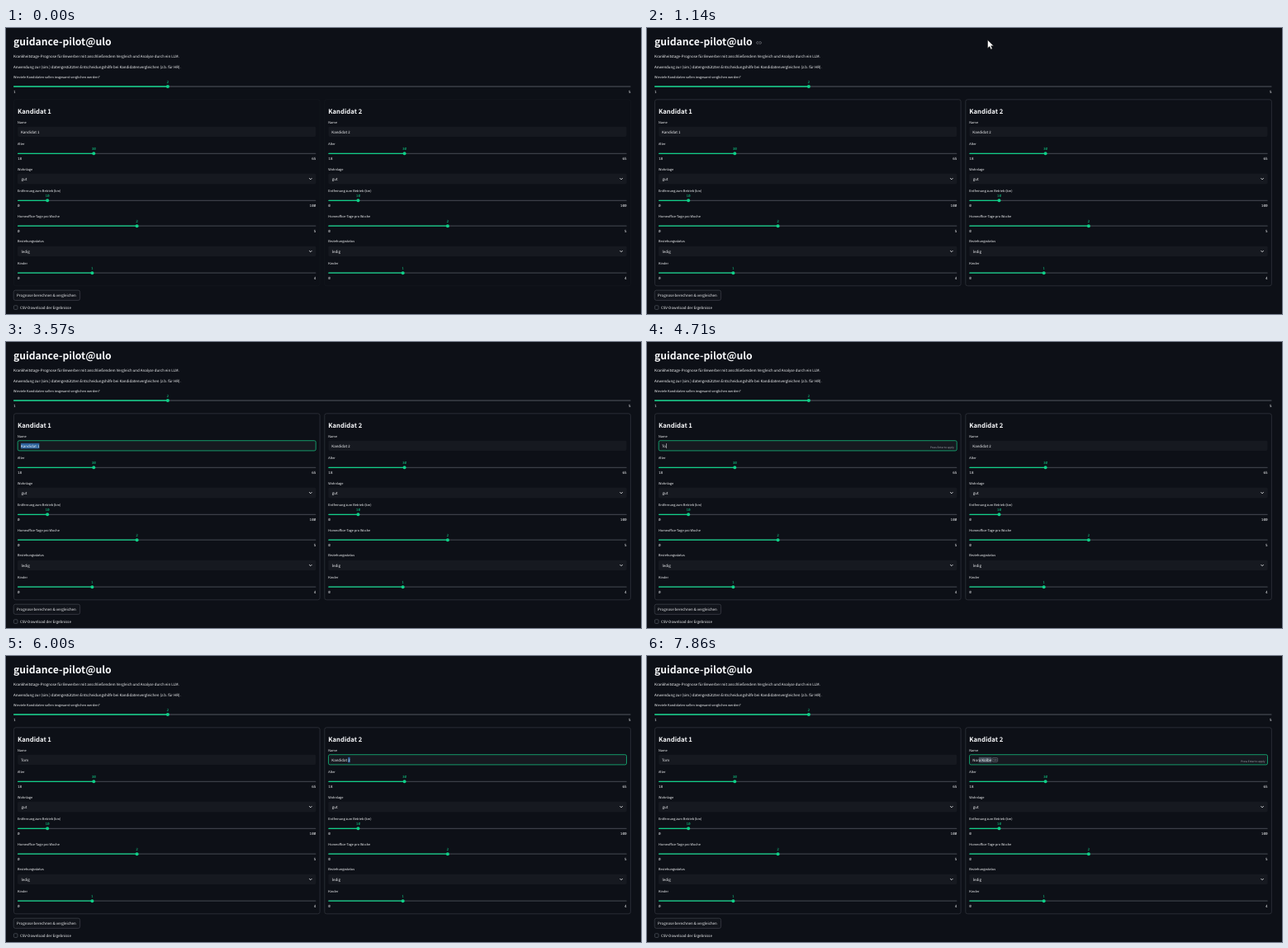
Animation of 769x347 px, one loop 8 s. Source, as an HTML page:

```html
<!DOCTYPE html>
<html lang="de">
<head>
<meta charset="utf-8">
<style>
html, body { margin: 0; width: 100%; height: 100%; overflow: hidden; background: #0d1017; }
svg { display: block; width: 769px; height: 347px; }
text {
  font-family: "Noto Sans CJK JP", "Noto Sans CJK SC", "Noto Sans CJK KR", "Noto Sans CJK", "Open Sans", sans-serif;
  fill: #f7f8fa; white-space: pre; text-rendering: geometricPrecision;
}
.bold { font-weight: 700; }
.mono { font-family: "Noto Sans Mono", monospace; }
</style>
</head>
<body>
<script>
const LOOP = 8000, STEP = LOOP / 56;
const GREEN = '#10cf88', FIELD = '#161920', LINE = '#30333c';
const BODY = 4.45, LABEL = 3.9, NUM = 4.35, NAME_Y = 125.9;

function add(parent, tag, attrs = {}) {
  const el = document.createElementNS('http://www.w3.org/2000/svg', tag);
  for (const key in attrs) el.setAttribute(key, attrs[key]);
  return parent.appendChild(el);
}

// y is the middle of the capital letters
function label(parent, x, y, size, str, attrs = {}) {
  const el = add(parent, 'text', { x, y: y + size * 0.36, 'font-size': size, ...attrs });
  el.textContent = str;
  return el;
}

function box(parent, x, y, width, height, attrs = {}) {
  return add(parent, 'rect', { x, y, width, height, rx: 1.8, ...attrs });
}

function slider(parent, x, y, width, low, high, value) {
  const pos = x + width * (value - low) / (high - low);
  const mono = { class: 'mono' };
  box(parent, x, y - 0.65, width, 1.3, { rx: 0.6, fill: '#3b3f47' });
  box(parent, x, y - 0.65, pos - x, 1.3, { rx: 0.6, fill: GREEN });
  add(parent, 'circle', { cx: pos, cy: y, r: 2, fill: GREEN });
  label(parent, pos, y - 5.7, NUM, value, { ...mono, style: 'fill:' + GREEN, 'text-anchor': 'middle' });
  label(parent, x, y + 6.4, NUM, low, mono);
  label(parent, x + width, y + 6.4, NUM, high, { ...mono, 'text-anchor': 'end' });
}

function select(parent, y, str) {
  box(parent, 14, y - 6.2, 361.4, 12.4, { fill: FIELD });
  label(parent, 18.5, y, BODY, str);
  add(parent, 'path', {
    d: `M367.2 ${y - 0.8}l1.6 1.6l1.6 -1.6`, fill: 'none', stroke: '#f2f3f5', 'stroke-width': 0.9
  });
}

function candidate(number) {
  const g = add(svg, 'g', { transform: `translate(${(number - 1) * 376.3} 0)` });
  const frame = box(g, 9.5, 86.8, 370.6, 226, { rx: 2.4, fill: 'none', stroke: LINE, 'stroke-width': 0.8 });
  label(g, 14, 100.8, 7.7, 'Kandidat ' + number, { class: 'bold' });

  label(g, 14, 114.3, LABEL, 'Name');
  const field = box(g, 14.2, 119.7, 361, 12.2, { fill: FIELD, 'stroke-width': 0.8 });
  const mark = box(g, 18, 122.8, 0, 6.6, { rx: 0 });
  const text = label(g, 18, NAME_Y, BODY, '');
  const caret = box(g, 0, 123, 0.5, 6, { rx: 0, fill: '#f7f8fa' });
  const hint = label(g, 372, 128.2, 3.15, 'Press Enter to apply', { style: 'fill:#a6a9b0', 'text-anchor': 'end' });
  const tab = add(g, 'g');
  box(tab, 0, 123.6, 6.6, 4.8, { rx: 1, fill: '#20242c', stroke: '#80858e', 'stroke-width': 0.5 });
  label(tab, 3.3, 126, 2.5, 'Tab', { style: 'fill:#a6a9b0', 'text-anchor': 'middle' });

  label(g, 14, 140.6, LABEL, 'Alter');
  slider(g, 14, 152.3, 361.4, 18, 65, 30);
  label(g, 14, 171.3, LABEL, 'Wohnlage');
  select(g, 183, 'gut');
  label(g, 14, 197.7, LABEL, 'Entfernung zum Betrieb (km)');
  slider(g, 14, 209.3, 361.4, 0, 100, 10);
  label(g, 14, 228.3, LABEL, 'Homeoffice-Tage pro Woche');
  slider(g, 14, 240.2, 361.4, 0, 5, 2);
  label(g, 14, 259, LABEL, 'Beziehungsstatus');
  select(g, 270.9, 'ledig');
  label(g, 14, 285.4, LABEL, 'Kinder');
  slider(g, 14, 297.2, 361.4, 0, 4, 1);

  const show = (el, on) => el.setAttribute('visibility', on ? 'visible' : 'hidden');
  const widthOf = n => n > 0 ? text.getSubStringLength(0, n) : 0;

  // from: index where the selection starts; it runs to the end of the text
  function setName({ str, focus, from = str.length, hinted, offer }) {
    text.textContent = str;
    const start = 18 + widthOf(from), end = 18 + widthOf(str.length);
    field.setAttribute('stroke', focus ? '#16b87c' : 'none');
    mark.setAttribute('x', start);
    mark.setAttribute('width', end - start);
    mark.setAttribute('fill', offer ? '#46505c' : '#2b629c');
    caret.setAttribute('x', end + 0.2);
    show(caret, focus && from === str.length);
    show(hint, hinted);
    show(tab, offer);
    tab.setAttribute('transform', `translate(${end + 0.8} 0)`);
  }
  return { frame, setName };
}

const svg = add(document.body, 'svg', { viewBox: '0 0 769 347' });
label(svg, 9, 16.8, 12.2, 'guidance-pilot@ulo', { class: 'bold' });
const anchor = add(svg, 'path', {
  d: 'M135 16.6h-1.2a1.3 1.3 0 0 0 0 2.6h1.2M136 16.6h1.2a1.3 1.3 0 0 1 0 2.6h-1.2M134.4 17.9h2.2',
  fill: 'none', stroke: '#81858c', 'stroke-width': 0.6
});
label(svg, 9, 34.2, BODY, 'Krankheitstage-Prognose für Bewerber mit anschließendem Vergleich und Analyse durch ein LLM.');
label(svg, 9, 47.1, BODY, 'Anwendung zur (sim.) datengestützten Entscheidungshilfe bei Kandidatenvergleichen (z.b. für HR).');
label(svg, 9, 59.4, LABEL, 'Wieviele Kandidaten sollen insgesamt verglichen werden?');
slider(svg, 9, 71, 747.6, 1, 5, 2);
const cards = [candidate(1), candidate(2)];
box(svg, 9.2, 318.2, 80.4, 12.2, { rx: 2.2, fill: '#11141b', stroke: '#3a3d46', 'stroke-width': 0.8 });
label(svg, 13, 324.3, BODY, 'Prognose berechnen & vergleichen');
box(svg, 9.4, 336.8, 4.6, 4.6, { rx: 1, fill: 'none', stroke: '#4a4e57', 'stroke-width': 0.8 });
label(svg, 17, 339.2, BODY, 'CSV-Download der Ergebnisse');

const outline = { fill: '#fff', stroke: '#111', 'stroke-width': 0.5, 'stroke-linejoin': 'round' };
const arrow = add(svg, 'path', { d: 'M0 0V10L2.4 7.9L4 11.4L5.7 10.6L4.1 7.2H7.3Z', ...outline });
const hand = add(svg, 'path', {
  d: 'M-1 .8Q0 -.6 1 .8V4.6L4.2 5.3Q5.4 5.7 5.2 7.2L4.3 10.4V12.4H-.9V10.9L-3.2 7.9Q-3.6 6.5 -2.3 6.7L-1 7.7Z',
  ...outline
});

const routes = [
  [[700, 470, -8], [1140, 412.5, 14.5], [1430, 412.5, 14.5], [2290, 234, 71.5], [2710, 234, 71.5], [3140, 42, 126]],
  [[4990, 20, 128], [5710, 417, 127]]
];

function pointer(t) {
  for (const route of routes) {
    for (let i = 1; i < route.length; i++) {
      const [t0, x0, y0] = route[i - 1], [t1, x1, y1] = route[i];
      if (t < t0 || t >= t1) continue;
      const p = (t - t0) / (t1 - t0), k = p * p * (3 - 2 * p);
      return [x0 + (x1 - x0) * k, y0 + (y1 - y0) * k];
    }
  }
}

// Selection dragged from the end of the text to its beginning
const drag = (t, t0, t1) => t >= t1 ? 0 : Math.ceil(10 * (t1 - t) / (t1 - t0));

function firstName(t) {
  if (t < 3140) return { str: 'Kandidat 1', focus: false };
  if (t < 4140) return { str: 'Kandidat 1', focus: true, from: drag(t, 3140, 3430) };
  const str = 'Tom'.slice(0, t < 4420 ? 1 : t < 4850 ? 2 : 3);
  return { str, focus: t < 5850, hinted: t >= 4420 && t < 5850 };
}

function secondName(t) {
  if (t < 5850) return { str: 'Kandidat 2', focus: false };
  if (t < 6850) return { str: 'Kandidat 2', focus: true, from: drag(t, 5850, 6700) };
  if (t >= 7560) return { str: 'Nora Kolbe', focus: true, from: 3, hinted: true, offer: true };
  return { str: 'Nor'.slice(0, t < 6990 ? 1 : t < 7420 ? 2 : 3), focus: true, hinted: t >= 7280 };
}

function draw(now) {
  const t = Math.floor(now % LOOP / STEP + 0.03) * STEP % LOOP;
  cards[0].setName(firstName(t));
  cards[1].setName(secondName(t));
  for (const card of cards) card.frame.setAttribute('opacity', Math.min(1, 0.2 + t / 700));

  const at = pointer(t + 4);
  const onSlider = at && at[1] > 66 && at[1] < 77;
  for (const [el, on] of [[arrow, at && !onSlider], [hand, onSlider]]) {
    el.setAttribute('visibility', on ? 'visible' : 'hidden');
    if (on) el.setAttribute('transform', `translate(${at})`);
  }
  anchor.setAttribute('visibility', at && at[1] > 7 && at[1] < 26 ? 'visible' : 'hidden');
  requestAnimationFrame(() => draw(performance.now()));
}
draw(0);
</script>
</body>
</html>
```
